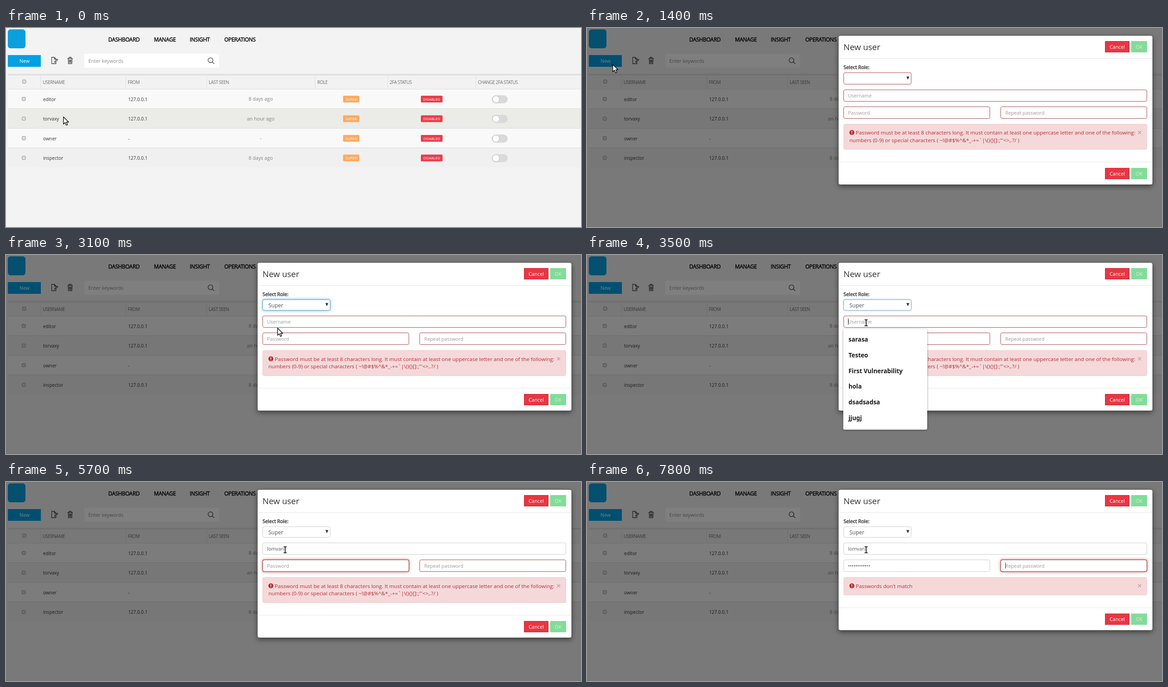
An HTML page for the animation above (8000 ms loop, 1271x441 px).

```html
<!DOCTYPE html>
<html lang="en">
<head>
<meta charset="utf-8">
<title>New user form</title>
<style>
  html, body { margin: 0; height: 100%; overflow: hidden; background: #f3f3f3; }
  svg { display: block; width: 100vw; height: 100vh; font-family: "Open Sans", sans-serif; }
  text { white-space: pre; }
</style>
</head>
<body>
<svg id="stage" viewBox="0 0 1271 441"></svg>
<script>
const LOOP = 8000, STEP = 100;
const stage = document.getElementById('stage');
const ruler = document.createElement('canvas').getContext('2d');
const TEXT = 10.8;
const USER = 'lomvani';
const ROLES = ['', 'Super', 'Inspector', 'Asset Owner', 'Guest'];
const SUGGESTIONS = ['sarasa', 'Testeo', 'First Vulnerability', 'hola', 'dsadsadsa', 'jjugj'];
const RULES = ['Password must be at least 8 characters long. It must contain at least one uppercase letter and one of the following:',
  'numbers (0-9) or special characters ( ~!@#$%^&*_-+=`|\\(){}[]:;"\'<>,.?/ )'];

// time, x, y of the pointer tip
const POINTER = [[400, 127, 197], [700, 108, 160], [1000, 57, 81], [1600, 57, 81], [1900, 260, 93],
  [2200, 578, 119], [2300, 586, 113], [2600, 586, 113], [2900, 592, 168], [3000, 592, 168], [3300, 617, 150]];
// time, number of characters present from then on
const NAME_KEYS = [[4300, 1], [4400, 2], [4500, 4], [4600, 5], [4700, 6], [4900, 7]];
const PASS_KEYS = [[5800, 1], [5900, 3], [6100, 5], [6200, 6], [6400, 7], [6500, 8], [6900, 9], [7000, 10], [7100, 11], [7300, 12]];

const between = (t, a, b) => t >= a && t < b;
const ramp = (t, a, b) => Math.min(1, Math.max(0, (t - a) / (b - a)));
const typed = (keys, t) => keys.reduce((n, [at, count]) => t >= at ? count : n, 0);
const escapeText = s => s.replace(/&/g, '&amp;').replace(/</g, '&lt;');

function pointerAt(t) {
  const next = POINTER.findIndex(k => k[0] > t);
  if (next === 0) return POINTER[0].slice(1);
  if (next < 0) return POINTER[POINTER.length - 1].slice(1);
  const [t0, x0, y0] = POINTER[next - 1], [t1, x1, y1] = POINTER[next];
  const k = (t - t0) / (t1 - t0);
  return [x0 + (x1 - x0) * k, y0 + (y1 - y0) * k];
}

const rect = (x, y, w, h, fill, extra = '') =>
  `<rect x="${x}" y="${y}" width="${w}" height="${h}" fill="${fill}" ${extra}/>`;
const line = (x1, y1, x2, y2, color) => `<path d="M${x1} ${y1}L${x2} ${y2}" stroke="${color}"/>`;
const path = (d, extra) => `<path d="${d}" ${extra}/>`;
const text = (x, y, s, fill = '#333', size = TEXT, extra = '') =>
  `<text x="${x}" y="${y}" fill="${fill}" font-size="${size}" ${extra}>${escapeText(s)}</text>`;
const MIDDLE = 'text-anchor="middle"';
const heavy = color => `stroke="${color}" stroke-width=".4"`;

const checkbox = (x, y) => rect(x + .5, y + .5, 7.5, 7.5, '#dedede', 'rx="1.5" stroke="#929292"');
const badge = (x, w, y, label, color) =>
  rect(x, y - 7.5, w, 15, color, 'rx="2"') + text(x + w / 2, y + 3, label, '#fff', 8, MIDDLE);

function page(t, [, py]) {
  const hover = between(t, 1000, 1400);
  const pressed = between(t, 1300, 1400);
  let s = rect(0, 0, 1271, 441, '#f3f3f3') + rect(4, 3, 39, 42, '#0b9fe0', 'rx="6"');
  [['DASHBOARD', 226], ['MANAGE', 327], ['INSIGHT', 406], ['OPERATIONS', 482.5]].forEach(([label, x]) =>
    s += text(x, 30, label, '#000', 12, heavy('#000') + ' letter-spacing="-.3"'));
  s += rect(4, 60, 73, 26, hover ? '#0a8fcb' : '#00a0e3');
  if (pressed) s += rect(4, 60, 73, 26, 'none', 'stroke="#a9785c" stroke-width="1.5"');
  s += text(41, 77, 'New', '#fff', TEXT, MIDDLE);

  const icon = 'fill="none" stroke="#444" stroke-width="1.3"';
  s += path('M111 69.500L107 65H101V79H110.500V76M107 65V69H111M107.500 76L108 73.500L113 69L114.500 70.500L109.500 75.500Z', icon);
  s += path('M136 67.500H147.500M139.500 67V65H144V67M137.500 68L138 79H145.500L146 68M140 70V77M141.800 70V77M143.600 70V77', icon);
  s += rect(173, 57, 298, 31, '#fff') + text(182, 77, 'Enter keywords', '#8c8c8c');
  s += `<circle cx="452" cy="71.500" r="5.300" ${icon}/>` + path('M456 75.500L460.500 79.500', icon);

  s += rect(4, 101.5, 1267, 4, '#e1e1e1') + rect(4, 105.5, 1267, 29, '#f2f2f2');
  [76, 264, 443, 683, 843, 1038].forEach(x => s += line(x + .5, 106, x + .5, 134, '#e0e0e0'));
  [['USERNAME', 81], ['FROM', 269], ['LAST SEEN', 448], ['ROLE', 688], ['2FA STATUS', 848], ['CHANGE 2FA STATUS', 1043]]
    .forEach(([label, x]) => s += text(x, 123.5, label, '#707070', 10, 'letter-spacing="-.5"'));
  s += checkbox(36, 114.5);

  [['editor', '127.0.0.1', '8 days ago'], ['torvaxy', '127.0.0.1', 'an hour ago'],
   ['owner', '-', '-'], ['inspector', '127.0.0.1', '8 days ago']].forEach(([name, from, seen], i) => {
    const top = 135 + i * 43.5, mid = top + 22.5;
    const over = t < 1000 && between(py, top, top + 43.5);
    s += rect(4, top, 1267, 43.5, over ? '#ebece7' : i % 2 ? '#f0f0f0' : '#f9f9f9');
    s += line(4, Math.floor(top) + .5, 1271, Math.floor(top) + .5, '#dcdcdc');
    s += checkbox(35, mid - 4.5) + text(82, mid + 4, name, '#333', 10.2) + text(270, mid + 4, from, '#333', 10.1);
    s += text(563, mid + 3.5, seen, '#808080', TEXT, MIDDLE);
    s += badge(745, 36, mid, 'SUPER', '#fdab62') + badge(917, 48, mid, 'DISABLED', '#ea3d4c');
    s += rect(1073.5, mid - 8.5, 35.5, 18, '#d9d9d9', 'rx="9"');
    s += `<circle cx="1083" cy="${mid + .5}" r="7.500" fill="#fff" stroke="#c6c6c6"/>`;
  });
  return s;
}

const TONES = { red: ['#a5474b', '#843534', '#e0625c'], blue: ['#ccc', '#5aa5df', '#66afe9'] };

function field(x, y, w, h, tone, focus) {
  const [idle, active, glow] = TONES[tone];
  const shadow = focus > 0 ? `style="filter:drop-shadow(0 0 ${3 * focus}px ${glow})"` : '';
  return rect(x + .5, y + .5, w - 1, h - 1, '#fff', `rx="3" stroke="${idle}" ${shadow}`) +
    (focus > 0 ? rect(x + .5, y + .5, w - 1, h - 1, 'none', `rx="3" stroke="${active}" stroke-opacity="${focus}"`) : '');
}

function entry(x, y, value, placeholder, caret) {
  ruler.font = `${TEXT}px "Open Sans", sans-serif`;
  return text(x, y, value || placeholder, value ? '#555' : '#999') +
    (caret ? rect(x + ruler.measureText(value).width, y - 11.5, 1, 14, '#222') : '');
}

const buttons = y => rect(1145.5, y + .5, 53, 24, '#e93642', 'stroke="#cf202d"') + text(1172, y + 16.5, 'Cancel', '#fff', TEXT, MIDDLE) +
  rect(1203, y, 35, 25, '#82dc98') + text(1220.5, y + 16.5, 'OK', '#d3f3db', TEXT, MIDDLE);

function alertBox(y, lines) {
  const h = lines.length > 1 ? 57 : 40, red = '#b32b36';
  let s = rect(567.5, y + .5, 670, h - 1, '#f5d9da', 'rx="3" stroke="#eccacd"');
  s += `<circle cx="585.500" cy="${y + 19}" r="5.500" fill="${red}"/>` + rect(584.6, y + 15.5, 1.8, 4.2, '#f5d9da') + rect(584.6, y + 20.8, 1.8, 1.8, '#f5d9da');
  lines.forEach((l, i) => s += text(i ? 580 : 594, y + 23.5 + i * 16.5, l, red, 11.6));
  return s + path(`M1218 ${y + 15.5}l7 7m0 -7l-7 7`, 'stroke="#bda5a6" stroke-width="1.6"');
}

function roleList(t, py) {
  const opacity = t < 2600 ? .6 : t < 3000 ? 1 : .35;
  const picked = Math.min(4, Math.max(0, Math.floor((py - 126) / 31)));
  let s = rect(567.5, 125, 150, 156, '#fcfbfa', 'stroke="#c9bdb8"');
  s += rect(568, 125 + picked * 31, 149.5, 31.5, '#f58a60');
  ROLES.forEach((role, i) => s += text(580.5, 146 + i * 31, role, i === picked ? '#fff' : '#4c4c4c'));
  return `<g opacity="${opacity}">${s}</g>`;
}

function suggestions(items, opacity) {
  const h = items.length > 1 ? 223 : 41, shadow = 'rx="3" style="filter:drop-shadow(0 1px 2px rgba(0,0,0,.4))"';
  return `<g opacity="${opacity}">` + rect(566.5, 164, 185.5, h, '#fff', shadow) +
    items.map((item, i) => text(578, 192 + i * 34.8, item, '#1a1a1a', 13.4, 'font-weight="700" font-family="Noto Sans, sans-serif"')).join('') + '</g>';
}

function modal(t, [, py]) {
  const chosen = t >= 3000, shift = chosen ? 0 : 2;
  const mismatch = t >= 6900, rise = mismatch ? -16.5 : shift;
  const name = USER.slice(0, typed(NAME_KEYS, t));
  const dots = '•'.repeat(typed(PASS_KEYS, t));

  let s = rect(0, 0, 1271, 441, '#000', 'opacity=".5"');
  s += rect(556, 17, 694, 328 + rise, '#fff', 'rx="4" stroke="#000" stroke-opacity=".25" style="filter:drop-shadow(0 4px 6px rgba(0,0,0,.5))"');
  s += text(567, 48.5, 'New user', '#333', 18.5) + buttons(29);
  s += line(556, 67.5, 1250, 67.5, '#e5e5e5') + text(567, 91, 'Select Role:', '#222', TEXT, heavy('#222'));

  const roleFocus = chosen ? 1 - ramp(t, 3300, 3700) : between(t, 2500, 3000) ? 1 : 0;
  s += field(567, 98.5, 150, chosen ? 24.5 : 26.5, chosen ? 'blue' : 'red', roleFocus);
  s += path(`M706 ${106.5 + shift / 2}h6.500l-3.250 7z`, 'fill="#333"') + (chosen ? text(580, 116, 'Super', '#555', 12) : '');

  const nameFocus = ramp(t, 3500, 3700) * (1 - ramp(t, 5100, 5300));
  s += field(567, 134.5 + shift, 671, 26.5, name ? 'blue' : 'red', nameFocus);
  s += entry(577, 152 + shift, name, 'Username', between(t, 3400, 5200) && !between(t, 4100, 4300));

  const passFocus = ramp(t, 5100, 5300) * (1 - ramp(t, 7500, 7700));
  s += field(567, 172 + shift, 324, 27, mismatch ? 'blue' : 'red', passFocus);
  s += entry(577, 189.8 + shift, dots, 'Password', between(t, 5200, 7600) && !between(t, 5700, 5800));
  s += field(914, 172 + shift, 324, 27, 'red', ramp(t, 7500, 7800));
  s += entry(924.5, 189.8 + shift, '', 'Repeat password', t >= 7600);

  s += alertBox(211 + shift * .75, mismatch ? ["Passwords don't match"] : RULES);
  s += line(556, 295 + rise, 1250, 295 + rise, '#e5e5e5') + buttons(308 + rise);

  if (between(t, 2500, 3100)) s += roleList(t, py);
  if (between(t, 3400, 4300)) s += suggestions(SUGGESTIONS, t < 3500 ? .5 : 1);
  if (between(t, 4300, 4700)) s += suggestions(['Misma USD 1000'], t < 4600 ? 1 : .1);
  return s;
}

function pointer(t, [x, y]) {
  const ink = 'fill="#fff" stroke="#000" stroke-width="1.3" stroke-linejoin="round"';
  let shape;
  if (t >= 3300) {
    const beam = 'M-3.500 -6.500H-1L0 -5.500L1 -6.500H3.500M0 -6V6.500M-3.500 7H-1L0 6L1 7H3.500';
    shape = path(beam, 'fill="none" stroke="#fff" stroke-width="3.500"') + path(beam, 'fill="none" stroke="#000" stroke-width="1.600"');
  } else if (between(t, 1000, 1400)) {
    shape = path('M-1 1.500Q0 0 1.500 1.500V6.500Q3 5 4.500 6.500Q6 5.500 7.200 7Q9.500 6.500 10 8.500V12L8.500 16H0.500L-3.500 10.500Q-3.500 8.500 -1 9.500Z', ink) +
      path('M1.500 6.500V9M4.500 6.500V9M7.200 7V9.500', 'stroke="#000"');
  } else {
    shape = path('M0 0V16L3.800 12.500L6.300 18.500L9 17.300L6.500 11.500H11.500Z', ink);
  }
  return `<g transform="translate(${x} ${y})">${shape}</g>`;
}

let shown = -1;
function draw() {
  const t = Math.floor(performance.now() % LOOP / STEP) * STEP;
  if (t !== shown) {
    const tip = pointerAt(t);
    stage.innerHTML = page(t, tip) + (t >= 1400 ? modal(t, tip) : '') + pointer(t, tip);
    shown = t;
  }
  requestAnimationFrame(draw);
}
draw();
</script>
</body>
</html>
```
